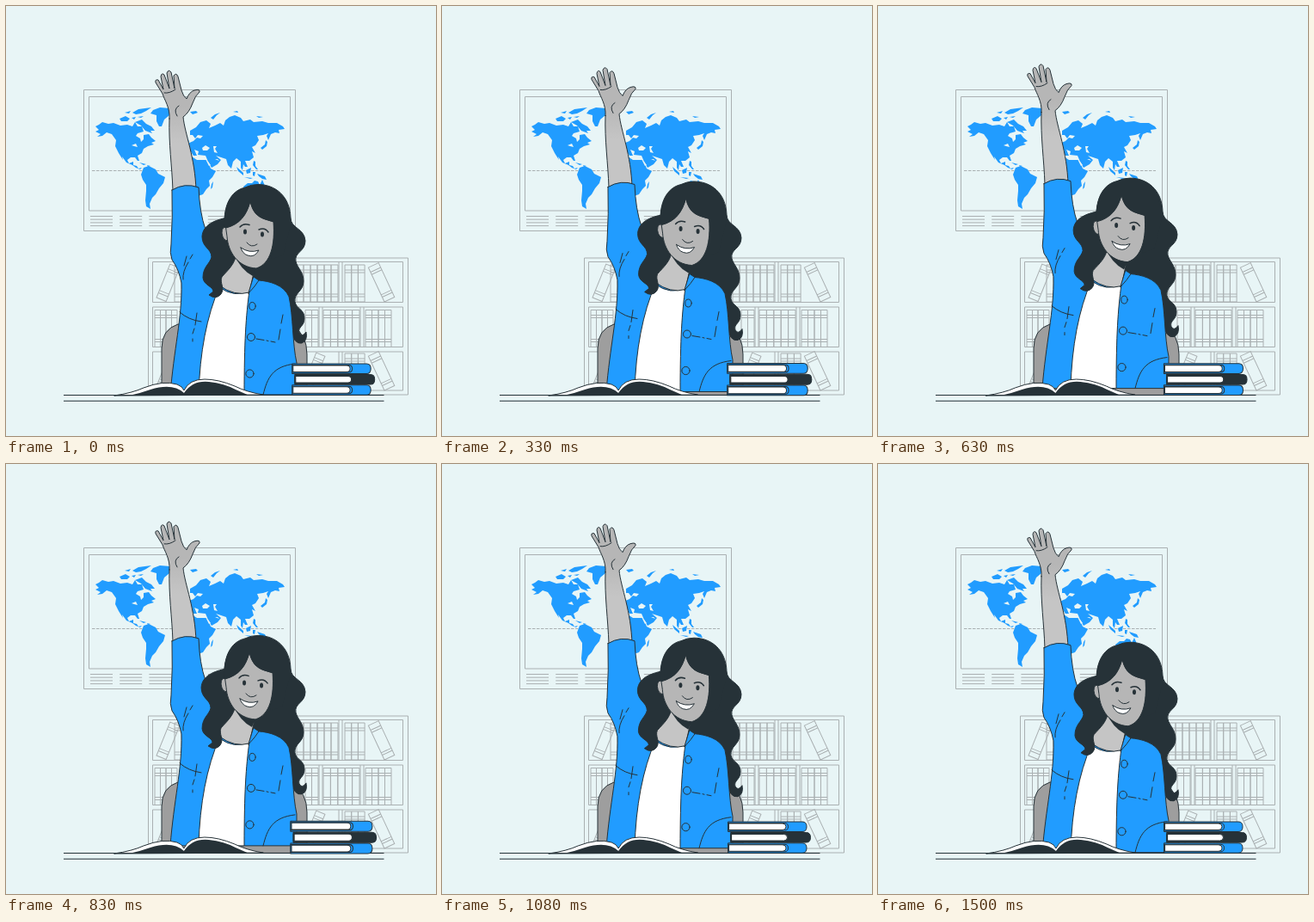
An HTML page for the animation above (1.54 s loop, 500 by 500 pixels).

```html
<!DOCTYPE html>
<html lang="en">
<head>
<meta charset="utf-8">
<title>Raised hand</title>
<style>
  html, body { margin: 0; width: 100%; height: 100%; overflow: hidden; background: #e8f5f6; }
  svg { display: block; width: 100vw; height: 100vh; }
  .thin { fill: none; stroke: #aab0b2; stroke-width: 1; }
  .ink { stroke: #263238; stroke-width: 1; stroke-linecap: round; stroke-linejoin: round; }
  .line { fill: none; }
  .blue { fill: #219cff; }
  .dark { fill: #263238; }
  .skin { fill: #b6b6b6; }
  .lit { fill: #c5c5c5; }
  .white { fill: #fff; }
  .sea { fill: #e8f5f6; }
</style>
</head>
<body>
<svg viewBox="0 0 500 500">
  <linearGradient id="armShade" x2="0" y2="1">
    <stop offset=".3" stop-color="#b6b6b6"/>
    <stop offset=".6" stop-color="#c5c5c5"/>
  </linearGradient>

  <g id="poster" class="thin">
    <path d="M90.500 97.500H336.500V261.500H90.500ZM96.500 105.500H330.500V238H96.500Z"/>
    <path d="M100 191.500H323" stroke-dasharray="3.500 1.500"/>
  </g>

  <g class="blue">
    <path d="M104 140L108 138 112 135 119 137 125 136 133 139 141 138 147 140 150 135 153 140 158 140 160 146 153 148 151 151 156 154 157 158 160 155 160 150 166 149 169 153 174 157 169 159 172 161 165 163 160 166 158 171 153 174 155 180 153 180 150 176 145 176 141 179 143 183 148 181 148 185 152 186 154 189 158 188 156 190 151 188 147 185 140 182 135 175 136 179 131 171 127 163 128 156 123 149 117 147 112 151 106 152 110 149 104 146 108 144Z"/>
    <path d="M150 135L158 132 163 137 169 140 173 145 168 145 170 148 162 145 157 139Z"/>
    <path d="M132 131L139 128 144 131 141 134 134 134ZM147 124L154 120 169 118 163 122 157 125 151 126ZM146 130L151 129 149 132ZM138 124L145 122 143 125ZM153 129L160 128 157 130Z"/>
    <path d="M171 121L179 118 191 119 190 127 184 132 181 140 178 140 175 134 175 127 168 125Z"/>
    <path d="M155 182L163 184 160 185ZM164 185L168 186 165 187Z"/>
    <path d="M160 188L166 186 174 190 177 195 185 199 183 206 178 212 174 219 170 223 167 230 168 236 163 233 162 226 163 215 163 208 159 202 157 196Z"/>
    <path d="M206 178L216 175 222 179 234 179 238 189 244 192 240 199 236 203 237 209 233 213 229 219 223 221 218 211 218 200 207 198 202 189ZM239 207L241 204 240 211 238 213Z"/>
    <path d="M206 172L207 166 213 165 211 160 218 157 222 153 226 154 229 151 223 150 220 154 217 150 214 150 214 145 221 141 226 135 233 133 238 137 236 142 243 139 249 136 253 139 255 133 260 129 266 127 273 130 276 134 284 132 288 135 298 134 305 136 315 136 322 140 324 143 317 144 318 148 313 147 308 149 305 156 303 151 305 148 299 150 292 151 294 156 290 162 286 164 290 171 286 169 288 176 283 180 278 180 281 187 278 187 276 184 275 191 273 188 273 181 268 177 264 181 262 189 258 185 256 178 250 176 244 174 250 179 246 184 239 188 235 181 232 174 223 173 224 169 219 167 222 174 218 174 214 168Z"/>
    <path d="M207 157L210 151 213 158ZM203 156L206 154 206 158ZM214 123L221 122 223 124 217 126ZM238 130L243 126 249 124 245 127 241 132ZM264 123L269 122 270 124ZM291 128L299 129 294 130Z"/>
    <path d="M296 165L301 161 302 156 304 158 303 163 298 167ZM288 180L290 181 290 186 293 190 291 190 287 185Z"/>
    <path d="M268 187L276 194 276 197 270 192ZM279 191L285 188 284 194 280 195ZM277 199L287 200 284 201ZM287 193L290 193 289 198 287 197ZM292 195L301 198 303 202 298 201 294 198Z"/>
    <path d="M276 210L281 206 286 206 289 203 293 204 295 208 298 202 301 209 306 215 301 225 290 221 278 223Z"/>
    <path class="sea" d="M228 165L232 162 237 165 234 168 229 168ZM241 163L245 163 243 166 246 171 242 170ZM146 162L151 160 153 164 149 163ZM230 174L238 185 236 186ZM246 178L248 180 243 178Z"/>
  </g>

  <g id="shelf" class="thin">
    <path d="M165.500 293H467.500V452H165.500ZM170.500 297.500H461.500V344.500H170.500ZM170.500 350H461.500V396.500H170.500ZM170.500 402H461.500V447H170.500ZM387 297V344M391 297V344M364 350V397M368 350V397M412 350V397M416 350V397M387 402V447M391 402V447"/>
  </g>

  <path class="ink" fill="#9e9e9e" d="M181 452V398Q181 376 200 370H332Q350 382 350 405V452Z"/>

  <g id="girl">
    <path class="ink dark" d="M254 250C254 228 264 214 278 211Q285 207.500 293 207.500C313 207.500 330 221 331 246C331 259 347 258 348 273C348 286 335 286 337 297C339 305 346 309 346 320C346 332 335 333 336 344C338 353 347 352 347 363C347 373 339 373 341 380Q344 386 349 379Q351 389 344 392Q335 394 331 376L300 335 270 290Z"/>

    <path class="ink" fill="url(#armShade)" d="M190 131C191 118 184 109 182 102L174 89Q173 85 177 86L183 97 180 82Q181 77 184 80L190 96 187 78Q189 73 192 77L196 96 195 81Q198 77 200 82L204 98Q206 105 210 108Q213 100 219 98Q226 96 225 100Q220 104 217 113Q213 124 206 129C208 149 220 176 221 215H194C193 185 189 160 190 131Z"/>
    <path class="ink line" d="M201 116Q194 120 199 128M184 101Q190 102 197 97"/>

    <path class="ink blue" d="M193 214Q208 205 224 211Q225 240 232 260L255 320 287 316 294 319C306 320 323 324 329 338C334 360 333 393 338 415V452H191C195 400 205 362 204 322Q201 306 193 295Q190 287 192 277Q194 245 193 214Z"/>
    <path class="ink white" d="M248 327Q266 340 283 331C279 360 277 390 277 452H224Q226 378 248 327Z"/>
    <path class="lit" d="M262 275L249 315V325Q266 338 283 333L290 301Z"/>
    <path class="ink line" d="M248 325Q266 338 283 333L290 301"/>
    <path class="ink blue" d="M288 315L294 319 289 326 282 334Z"/>
    <path class="ink line" d="M299 452C304 432 310 419 336 416M322 359L320 369M319 376L317 388M291 387L300 388.500M303 389L305 389.500M308 390L313 391M210 291L207 302M217 289L214 294M212 298Q205 309 206 318M202 356Q212 365 227 367M222 357L220 371M219 375L217 381M217 387L217 390"/>
    <g class="ink line">
      <ellipse cx="286.500" cy="349" rx="3.700" ry="4.500"/>
      <circle cx="285" cy="385" r="4.500"/>
      <circle cx="283.500" cy="427.500" r="4.600"/>
    </g>

    <g id="head">
      <path class="ink dark" d="M257 246C243 249 229 254 228 268C228 281 239 282 239 292C237 300 229 303 229 316C230 325 241 326 241 332L236 336Q244 342 250 335C255 328 248 322 251 315C258 307 267 300 268 286L260 252Z"/>
      <path class="dark" d="M264 287L292 302 287 314Q273 307 264 287Z"/>
      <path class="ink skin" d="M257 258Q251 255 251 264Q252 273 258 273Z"/>
      <path class="ink skin" d="M256 258C272 254 280 243 284 227C288 246 299 247 311 251C313 277 308 300 291 305C270 304 258 286 257 268Z"/>
      <path class="dark" d="M254 256C254 230 264 215 278 212Q285 208.500 293 208.500C315 208.500 330 224 331 255L322 290 308 295Q313 270 311 251C299 248 288 246 284 228C280 243 272 254 254 258Z"/>
      <g class="dark">
        <ellipse cx="278" cy="262.500" rx="2" ry="3"/>
        <ellipse cx="298" cy="265.500" rx="2" ry="3"/>
      </g>
      <path class="ink line" style="stroke-width:1.500" d="M272 257Q276 252 283 254.500M294 260Q301 257 305 263"/>
      <path class="ink line" d="M280 275Q285 282 292 277"/>
      <path class="ink white" d="M273 281Q283 288 294 284Q289 293 281 290Q275 288 273 281Z"/>
    </g>
  </g>

  <g id="openBook">
    <path class="ink white" d="M126 453Q147 450 160 444Q183 435 199 440Q205 442 207 447Q213 434 231 434Q247 434 266 442Q280 449 299 452Z"/>
    <path class="dark" d="M143 453Q157 450 168 446Q194 438 207 450Q217 435 236 437Q254 439 267 446L283 453Z"/>
  </g>

  <path d="M67 452.500H439.500M67 459.300H439.500" fill="none" stroke="#263238" stroke-width="1.100"/>
  <g id="stack"></g>
</svg>
<script>
const byId = id => document.getElementById(id);
const PERIOD = 1540;

function add(parent, tag, attrs) {
  const node = document.createElementNS('http://www.w3.org/2000/svg', tag);
  for (const key in attrs) node.setAttribute(key, attrs[key]);
  byId(parent).append(node);
}

// Caption rules below the map
for (let x = 98; x < 310; x += 34.2)
  for (let y = 244.5; y < 257; y += 3.7)
    add('poster', 'path', { d: `M${x} ${y}h26` });

function shelfBook(x, y, w, h, turn = 0) {
  add('shelf', 'path', {
    d: `M0 0h${w}v${-h}h${-w}ZM0 -6h${w}M0 -9h${w}M0 ${6 - h}h${w}M0 ${9 - h}h${w}`,
    transform: `translate(${x} ${y}) rotate(${turn})`
  });
}
function bookRow(x, y, count, w) {
  for (let i = 0; i < count; i++) shelfBook(x + i * w, y, w, 43);
}
for (const y of [344, 447]) {
  shelfBook(175, y - 5, 12, 42, 22);
  shelfBook(440, y, 13, 44, -25);
  bookRow(394, y, 3, 7.7);
}
shelfBook(196, 344, 8, 43);
shelfBook(345, 442, 11, 42, 22);
bookRow(338, 344, 6, 8);
bookRow(173, 396.5, 4, 6.5);
bookRow(348, 396.5, 2, 7.5);
bookRow(369, 396.5, 5, 8.4);
bookRow(418, 396.5, 4, 7.5);

function stackedBook(x, y, right, cover) {
  const shape = (l, t, r, b, bow) => `M${l} ${t}H${r - bow}Q${r} ${t} ${r} ${(t + b) / 2}T${r - bow} ${b}H${l}Z`;
  const pageEnd = 400 + (x - 333) / 2;
  add('stack', 'path', { class: 'ink ' + cover, d: shape(x, y, right, y + 11.5, 5) });
  add('stack', 'path', { class: 'ink ' + cover, d: shape(x, y + 1.5, pageEnd + 2.5, y + 10, 4) });
  add('stack', 'path', { class: 'ink white', d: shape(x + 1, y + 2, pageEnd, y + 9.5, 4) });
}
stackedBook(333, 416, 424, 'blue');
stackedBook(336, 428.5, 428.5, 'dark');
stackedBook(333, 440.8, 424, 'blue');

const smooth = u => (1 - Math.cos(Math.PI * u)) / 2;

// Two beats per loop, with a rest after each
function beat(p) {
  const keys = [[0, 0], [.1, 1], [.3, 0], [.4, 0], [.5, 1], [.6, 0], [1, 0]];
  const i = keys.findIndex(key => key[0] > p);
  const [from, a] = keys[i - 1], [to, b] = keys[i];
  return a + (b - a) * smooth((p - from) / (to - from));
}

function draw(now) {
  const p = now / PERIOD % 1;
  const ramp = 1 - Math.abs(2 * p - 1);
  const lift = (ramp + smooth(ramp)) / 2;
  byId('girl').setAttribute('transform', `translate(0 ${-8.5 * lift})`);
  byId('head').setAttribute('transform', `translate(${-lift} 0)`);
  byId('openBook').setAttribute('transform', `translate(${-2 * Math.sin(2 * Math.PI * p) ** 2} 0)`);
  const size = 1 + .095 * beat((p + .013) % 1);
  byId('stack').setAttribute('transform', `translate(380 434.5) scale(${size}) translate(-380 -434.5)`);
}

const start = performance.now();
function tick() {
  draw(performance.now() - start);
  requestAnimationFrame(tick);
}
tick();
</script>
</body>
</html>
```
